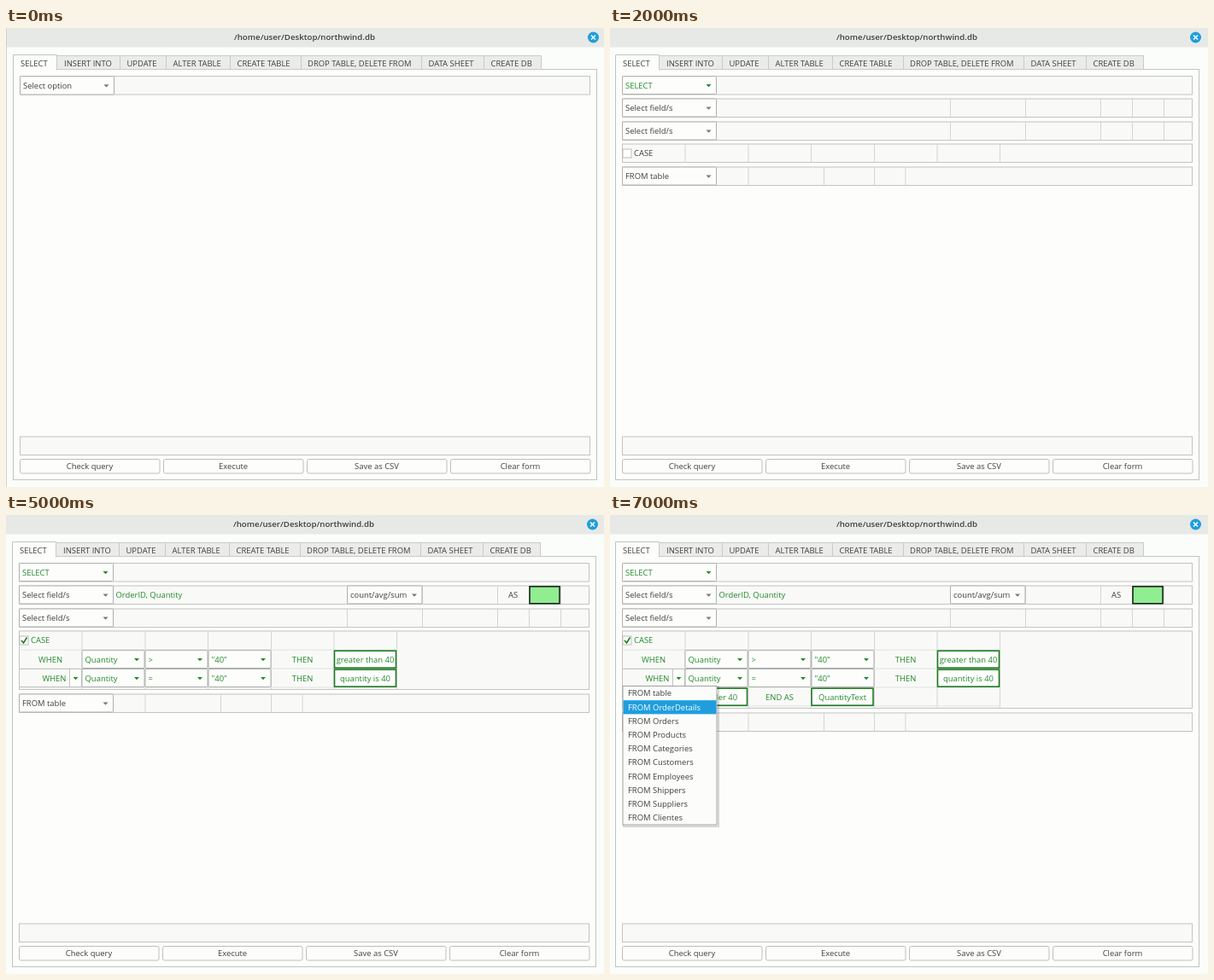
An HTML page for the animation above (8 s loop, 700 by 538 pixels).

```html
<!DOCTYPE html>
<html lang="en">
<head>
<meta charset="utf-8">
<title>Query builder</title>
<style>
html, body { margin: 0; width: 100%; height: 100%; overflow: hidden; background: #fbfdfa; }
svg { display: block; width: 700px; height: 538px; }
text { font: 9.45px "Open Sans", "Noto Sans", sans-serif; white-space: pre; }
</style>
</head>
<body>
<svg id="stage" viewBox="0 0 700 538"></svg>
<script>
const INK = '#3d403d', GREEN = '#23892a', LINE = '#c2c4c1', PALE = '#d3d5d2', EDGE = '#adb0ad';
const FIELD = '#f9faf8', BLUE = '#1f9ede';
const stage = document.getElementById('stage');

const rect = (x, y, w, h, fill, stroke = 'none', sw = 1, r = 0) =>
  `<rect x="${x}" y="${y}" width="${w}" height="${h}" rx="${r}" fill="${fill}" stroke="${stroke}" stroke-width="${sw}"/>`;
const path = (d, stroke, sw = 1, fill = 'none') =>
  `<path d="${d}" fill="${fill}" stroke="${stroke}" stroke-width="${sw}"/>`;
const text = (s, x, y, fill = INK, anchor = 'start', extra = '') =>
  `<text x="${x}" y="${y}" fill="${fill}" text-anchor="${anchor}" ${extra}>${s}</text>`;
const mid = (s, x, y, fill) => text(s, x, y, fill, 'middle');
const vlines = (xs, y, h) => path(xs.map(x => `M${x} ${y}v${h}`).join(''), PALE);
const arrow = (x, y, fill) => path(`M${x - 3} ${y - 1.5}h6l-3 3.2z`, 'none', 0, fill);

const row = (y, xs = [], h = 21.5) => rect(16.5, y, 667, h, FIELD, LINE) + vlines(xs, y, h);

function combo(label, x, y, w, fill = INK, h = 21) {
  return rect(x, y, w, h, '#fdfefc', EDGE, 1, 1) +
    text(label, x + 3.5, y + h / 2 + 3.5, fill) + arrow(x + w - 9, y + h / 2 + .5, fill === INK ? '#777' : fill);
}
const entry = (label, x, y) =>
  rect(x, y, 72, 20, '#fff', '#1d7a22', 1.6) + mid(label, x + 36, y + 13.3, GREEN);
const field = (label, y) => combo(label, 16.5, y, 110);

const TABS = [['SELECT', 17, 59.5], ['INSERT INTO', 68, 133.5], ['UPDATE', 141.5, 187.5],
  ['ALTER TABLE', 195.5, 262.5], ['CREATE TABLE', 270.5, 345.5],
  ['DROP TABLE, DELETE FROM', 353, 486.5], ['DATA SHEET', 494.5, 559.5], ['CREATE DB', 567.5, 626.5]];

function frame() {
  let s = rect(0, 0, 710, 538, '#fbfdfa') + rect(-10, 0, 720, 22.5, '#e7e9e7') +
    text('/home/user/Desktop/northwind.db', 349.5, 14, INK, 'middle', 'style="font-weight:600;font-size:9.7px"') +
    `<circle cx="687.5" cy="11" r="6.5" fill="${BLUE}"/>` +
    path('M685 8.5l5 5m0-5l-5 5', '#fff', 1.5) + path('M.5 0v538', '#d2d4d1') +
    rect(8.5, 48.5, 683, 481, '#fdfefc', LINE);
  let left = 8.5;
  TABS.forEach(([label, x, right], i) => {
    s += i ? rect(left, 32.5, right - left, 16, '#ebecea', '#c9cbc8')
           : path(`M${left} 49.5V31.5H${right}V49.5`, LINE, 1, '#fdfefc');
    s += text(label, x, 44.6);
    left = right;
  });
  s += row(479);
  ['Check query', 'Execute', 'Save as CSV', 'Clear form'].forEach((label, i) => {
    s += rect(16.5 + 168 * i, 505.5, 163.5, 16.5, '#fdfefc', '#bcbfbb', 1, 2) + mid(label, 98 + 168 * i, 517);
  });
  return s;
}

const FIELD_COLS = [126.5, 400.5, 488.5, 576.5, 613.5, 650.5];
const CASE_COLS = [90, 164, 237.5, 311.5, 385, 458.5];

function whenRow(i, sign, answer) {
  const y = 158.5 + 22 * i;
  return (i ? keyword('WHEN', y) : text('WHEN', 39, y + 14, GREEN)) +
    combo('Quantity', 90, y, 73, GREEN) + combo(sign, 164, y, 73, GREEN) +
    combo('"40"', 238, y, 73, GREEN) + mid('THEN', 348, y + 14, GREEN) + entry(answer, 385.5, y + .7);
}
const keyword = (label, y) => rect(16.5, y, 73, 21, FIELD, LINE) + rect(75.5, y, 14, 21, '#fdfefc', LINE) +
  text(label, 71.5, y + 14, GREEN, 'end') + arrow(82.5, y + 11, GREEN);

function caseBox(n) {
  const h = n ? 24.5 + 22 * n : 21.5;
  let s = row(136, [], h) + vlines(CASE_COLS, 136, h) +
    rect(17, 142, 10, 10, '#fff', '#bbbdba') + text('CASE', 30, 150.3, n ? GREEN : INK);
  if (!n) return s;
  for (let i = 0; i <= n; i++) s += path(`M16.5 ${158 + 22 * i}H458.5`, '#e0e2df');
  s += path('M19 147l2.5 3 4-6.5', '#1d7a22', 1.6) + whenRow(0, '&gt;', 'greater than 40');
  if (n > 1) s += whenRow(1, '=', 'quantity is 40');
  if (n > 2) s += keyword('ELSE', 202.5) + entry('is under 40', 90.5, 203.2) +
    mid('END AS', 200.5, 216.5, GREEN) + entry('QuantityText', 238, 203.2);
  return s;
}

function form({ open, picked, cases = 0 }) {
  if (!open) return row(56.5) + combo('Select option', 16.5, 56.5, 110, INK, 21.5);
  let s = row(56.5) + combo('SELECT', 16.5, 56.5, 110, GREEN) +
    row(83, FIELD_COLS) + field('Select field/s', 83) +
    row(110, FIELD_COLS) + field('Select field/s', 110) + caseBox(cases);
  if (picked) s += text('OrderID, Quantity', 129.5, 97.3, GREEN) +
    combo('count/avg/sum', 400.5, 83, 87.5) + mid('AS', 594.5, 97.3) +
    rect(614, 83.8, 35, 20, '#90ee90', '#1f241f', 1.6);
  const y = cases ? 166 + 22 * cases : 163;
  return s + row(y, [164, 252.5, 311.5, 348]) + field('FROM table', y);
}

const FIELDS = `OrderDetai…erDetailID OrderDetails,OrderID OrderDetails,ProductID OrderDetails,Quantity
Orders,OrderID Orders,CustomerID Orders,EmployeeID Orders,OrderDate Orders,ShipperID
Products,ProductID Products,ProductName Products,SupplierID Products,CategoryID Products,Unit Products,Price
Categories,CategoryID Categorie…egoryName Categories,Description
Customers,CustomerID Customer…omerName Customers…ntactName Customers,Address Customers,City
Customers,PostalCode Customers,Country
Employees,EmployeeID Employees,LastName Employees,FirstName Employees,BirthDate Employees,Photo Employees,Notes
Shippers,ShipperID`.split(/\s+/);
const TABLES = ['table', 'OrderDetails', 'Orders', 'Products', 'Categories', 'Customers',
  'Employees', 'Shippers', 'Suppliers', 'Clientes'];
const PITCH = 16.2;

const shadow = (x, y, w, h) => rect(x + 1, y + 1, w + 1, h + 1, 'none', 'rgba(0,0,0,.16)', 2);

function fieldMenu() {
  let s = shadow(17.5, -5, 140, 560) + rect(17.5, -5, 140, 560, '#fcfdfb', '#aaadaa') + text('Select field/s', 23, 10.8);
  [...FIELDS, ''].forEach((label, i) => {
    const y = 24 + PITCH * i;
    s += rect(23.5, y - 7.2, 15, 14.6, '#fafbf9', '#cfd1ce') + text(label, 43.5, y + 3.2);
    if (i === 1 || i === 3) s += path(`M27 ${y}l3.2 4.5 5.6-9.3`, '#111', 1.9);
  });
  return s;
}

function tableMenu() {
  let s = shadow(17, 200.5, 110, 162.5) + rect(17, 200.5, 110, 162.5, '#fcfdfb', '#9fa29f');
  TABLES.forEach((name, i) => {
    const y = 209 + PITCH * i, on = i === 1;
    if (on) s += rect(17.5, y - 8, 109, PITCH, BLUE);
    s += text('FROM ' + name, 23, y + 3.3, on ? '#fff' : INK);
  });
  return s;
}

// One state per second; dx is the small sideways jitter of the window.
const STEPS = [
  { dx: 0 },
  { dx: -1 },
  { dx: -2, open: true },
  { dx: 0, open: true, picked: true, menu: fieldMenu },
  { dx: -1, open: true, picked: true },
  { dx: -1, open: true, picked: true, cases: 2 },
  { dx: 0, open: true, picked: true, cases: 3 },
  { dx: -2, open: true, picked: true, cases: 3, menu: tableMenu }
];
const STEP_MS = 1000;

stage.innerHTML = STEPS.map(s =>
  `<g transform="translate(${s.dx})" visibility="hidden">${frame()}${form(s)}${s.menu ? s.menu() : ''}</g>`).join('');
const scenes = [...stage.children];

let shown = -1;
function tick(now) {
  const i = Math.floor(now / STEP_MS) % STEPS.length;
  if (i !== shown) {
    scenes.forEach((g, k) => g.setAttribute('visibility', k === i ? 'visible' : 'hidden'));
    shown = i;
  }
  requestAnimationFrame(tick);
}
tick(performance.now());
</script>
</body>
</html>
```
